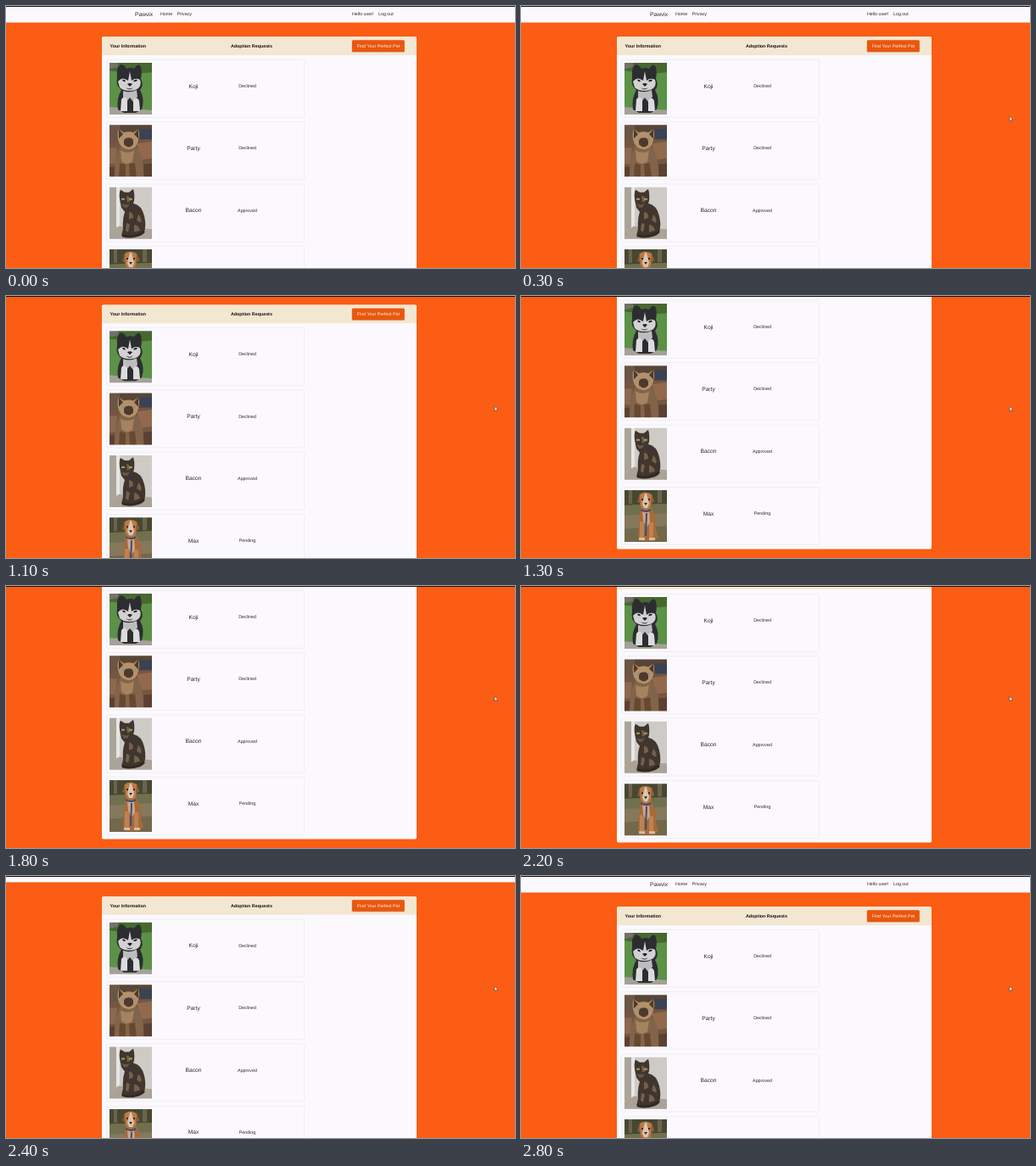
An HTML page for the animation above (2900 ms loop, 600 by 309 pixels).

```html
<!DOCTYPE html>
<html lang="en">
<head>
<meta charset="utf-8">
<title>Adoption requests</title>
<style>
  html, body { margin: 0; height: 100%; overflow: hidden; background: #fa5d13; }
  svg { display: block; }
  text { font: 5.33px "Liberation Sans", Arial, sans-serif; fill: #2b292d; text-rendering: geometricPrecision; }
  .big { font-size: 6.67px; }
  .bold { font-weight: bold; fill: #111; }
  .mid { text-anchor: middle; }
</style>
</head>
<body>
<svg width="600" height="309" viewBox="0 0 600 309">
  <defs>
    <clipPath id="frame"><rect width="50" height="61"/></clipPath>
    <filter id="soft" x="0" y="0" width="1" height="1"><feGaussianBlur stdDeviation=".55"/></filter>

    <g id="husky">
      <rect x="-3" y="-3" width="56" height="67" fill="#5c9147"/>
      <path d="M-3-3H53V11L30 13 -3 9Z" fill="#47682f"/>
      <path d="M-3-3H10V5L-3 8Z" fill="#747268"/>
      <path d="M-3 52L53 56V64H-3Z" fill="#a5a09a"/>
      <path d="M9 18Q8 5 13 2 17 2 20 7 25 5 29 7 33 1 36 3 39 9 37 19 41 26 36 32 42 43 38 55L31 59H17L10 55Q8 42 14 32 7 27 9 18Z" fill="#2c2d31"/>
      <path d="M10 22Q14 17 18 19L22 21 24 10 26 21Q31 17 36 20 38 26 34 30 30 33 24 33 16 33 12 29Z" fill="#d3d1d2"/>
      <path d="M16 33Q24 36 32 32L33 40 28 46 24 41 19 47 16 42Z" fill="#bdbcbf"/>
      <path d="M14 43Q18 38 21 44L21 57H13ZM28 44Q33 39 35 45L36 57H28Z" fill="#dddcdc"/>
      <path d="M15 20q3-1 4 2-3 1-4-2zM28 22q1-3 5-2-1 3-5 2zM21 25q3-2 6 0l-3 3zM19 29q5 3 9 0-4 5-9 0z" fill="#222125"/>
    </g>

    <g id="siamese">
      <rect x="-3" y="-3" width="56" height="67" fill="#755640"/>
      <path d="M-3-3H53V16L-3 20Z" fill="#584536"/>
      <path d="M-3-3H12V20H-3Z" fill="#6b5545"/>
      <path d="M35 5H53V17H37Z" fill="#3a4354"/>
      <path d="M32 22L53 19V39L38 41Z" fill="#92694d"/>
      <path d="M-3 27H9L7 46H-3Z" fill="#8c6850"/>
      <path d="M-3 50L53 45V64H-3Z" fill="#5c4031"/>
      <path d="M13 25Q22 30 31 25 42 37 40 64H6Q5 39 13 25Z" fill="#82644a"/>
      <path d="M10 17Q9 8 11 5L17 9Q23 7 28 9L34 5Q36 10 34 18 32 28 23 29 12 28 10 17Z" fill="#b39169"/>
      <path d="M11 5l5 6-5 5zM34 5l-5 6 5 5zM17 17Q23 13 28 17L28 23Q23 29 17 23Z" fill="#4e392c"/>
      <path d="M15 16h3v2h-3zM27 16h3v2h-3z" fill="#7c909b"/>
      <path d="M13 30Q22 35 29 30L27 43Q20 49 14 42Z" fill="#a5835f"/>
      <path d="M12 45l7 2v17h-8zM23 46l7-1 2 19h-8z" fill="#66492f"/>
    </g>

    <g id="tortie">
      <rect x="-3" y="-3" width="56" height="67" fill="#cecbc7"/>
      <path d="M-3-3H8V48L-3 55Z" fill="#aaa598"/>
      <path d="M8-3H12V45L8 48Z" fill="#e8e6e4"/>
      <path d="M-3 55L11 46 53 50V64H-3Z" fill="#aba298"/>
      <path d="M12 14Q11 6 13 3L18 6H23L28 2Q30 8 29 16L28 19Q38 21 41 34 44 47 40 55 34 60 23 58L14 57 16 49Q15 37 18 29L14 24Z" fill="#40362f"/>
      <path d="M20 10q5 1 5 6l-4 2zM23 29q5 0 5 7l-5 2zM34 32q5 5 3 10l-5-3zM20 42l4 2-2 9-3-2zM29 44q6 1 7 7l-7 2z" fill="#75604a"/>
      <path d="M14 19q6 3 10 0l-3 5h-4z" fill="#6b5544"/>
      <path d="M14 13h4v2h-4zM23 13h4v2h-4z" fill="#a59a57"/>
      <path d="M15 57Q30 61 41 52" fill="none" stroke="#322922" stroke-width="3"/>
    </g>

    <g id="hound">
      <rect x="-3" y="-3" width="56" height="67" fill="#85785c"/>
      <path d="M-3-3H53V16L-3 18Z" fill="#474832"/>
      <path d="M5-3h4v19H5zM39-3h5v18h-5z" fill="#6c634d"/>
      <path d="M-3 18L53 16V27L-3 30Z" fill="#70704e"/>
      <path d="M-3 46L53 42V64H-3Z" fill="#72684b"/>
      <path d="M19 20Q26 24 31 20 39 31 37 46L40 56 34 60H20L16 56Q17 31 19 20Z" fill="#a66a3b"/>
      <path d="M18 5Q24 0 32 5L35 13 32 15 30 21 25 23 20 20 18 15 16 13Z" fill="#bc7b45"/>
      <path d="M18 5l-3 9 4 1zM32 5l3 9-4 1z" fill="#915b35"/>
      <path d="M24 4h2l3 12-2 5h-4l-2-5z" fill="#d9c6b1"/>
      <path d="M21 24q4 3 8 0l1 14-4 6-4-8z" fill="#cda685"/>
      <path d="M18 37h5v21h-5zM29 38h5v20h-5z" fill="#bd8152"/>
      <path d="M20 10h2v2h-2zM28 10h2v2h-2zM23 15h4l-2 3z" fill="#30251e"/>
      <path d="M19 23Q26 27 31 23M26 27L25 54" fill="none" stroke="#3c4c77" stroke-width="2"/>
      <path d="M17 56h7v3h-7zM29 56h7v3h-7z" fill="#d5bda1"/>
    </g>
  </defs>

  <rect width="600" height="309" fill="#fa5d13"/>
  <g id="page">
    <rect width="600" height="19.5" fill="#fbf9fd"/>
    <text x="152" y="11.8" class="big">Pawvix</text>
    <text x="182" y="11.4">Home</text>
    <text x="201.5" y="11.4">Privacy</text>
    <text x="408" y="11.4">Hello user!</text>
    <text x="439" y="11.4">Log out</text>

    <rect x="113" y="36.3" width="371" height="320.2" rx="1.8" fill="#fbf9fd"/>
    <path d="M113 58V38q0-1.7 1.8-1.7H482.2q1.8 0 1.8 1.7V58Z" fill="#f4e7d1"/>
    <text x="122.5" y="49" class="bold">Your Information</text>
    <text x="265" y="49" class="bold">Adoption Requests</text>
    <rect x="407.5" y="40.7" width="62.5" height="14" rx="1.5" fill="#b58b6d" opacity=".6"/>
    <rect x="408" y="40.3" width="61.7" height="13.7" rx="1.3" fill="#ea560e"/>
    <text x="438.9" y="49.1" class="mid" style="fill:#fff3e9">Find Your Perfect Pet</text>
    <g id="rows"></g>
  </g>

  <rect width="600" height="1" fill="#171315"/>
  <path id="cursor" d="M576 130.3V135.6L577.3 134.5 578.1 136.2 579 135.7 578.2 134.1H579.8Z"
        fill="#fff" stroke="#343038" stroke-width=".5"/>
</svg>
<script>
const LOOP = 2900, STEP = 100, MAX_SCROLL = 58, ROW_HEIGHT = 73.35;
const pets = [
  ["husky", "Koji", "Declined"],
  ["siamese", "Party", "Declined"],
  ["tortie", "Bacon", "Approved"],
  ["hound", "Max", "Pending"],
];
const byId = id => document.getElementById(id);

byId("rows").innerHTML = pets.map(([photo, name, status], i) => `
  <g transform="translate(0 ${i * ROW_HEIGHT})">
    <rect x="118.5" y="63.3" width="233" height="68" rx="1" fill="none" stroke="#edebf0" stroke-width=".8"/>
    <g transform="translate(122 67)" clip-path="url(#frame)"><use href="#${photo}" filter="url(#soft)"/></g>
    <text x="221" y="96.6" class="big mid">${name}</text>
    <text x="284.5" y="96" class="mid">${status}</text>
  </g>`).join("");

function ease(time, start, duration) {
  const t = Math.min(1, Math.max(0, (time - start) / duration));
  return (1 - Math.cos(Math.PI * t)) / 2;
}

function draw(now) {
  const time = Math.floor(now % LOOP / STEP) * STEP;
  const scroll = MAX_SCROLL * (ease(time, 935, 355) - ease(time, 2135, 380));
  byId("page").setAttribute("transform", `translate(0 ${-scroll})`);
  byId("cursor").style.display = time < 100 ? "none" : "";
  requestAnimationFrame(draw);
}
draw(performance.now());
</script>
</body>
</html>
```
